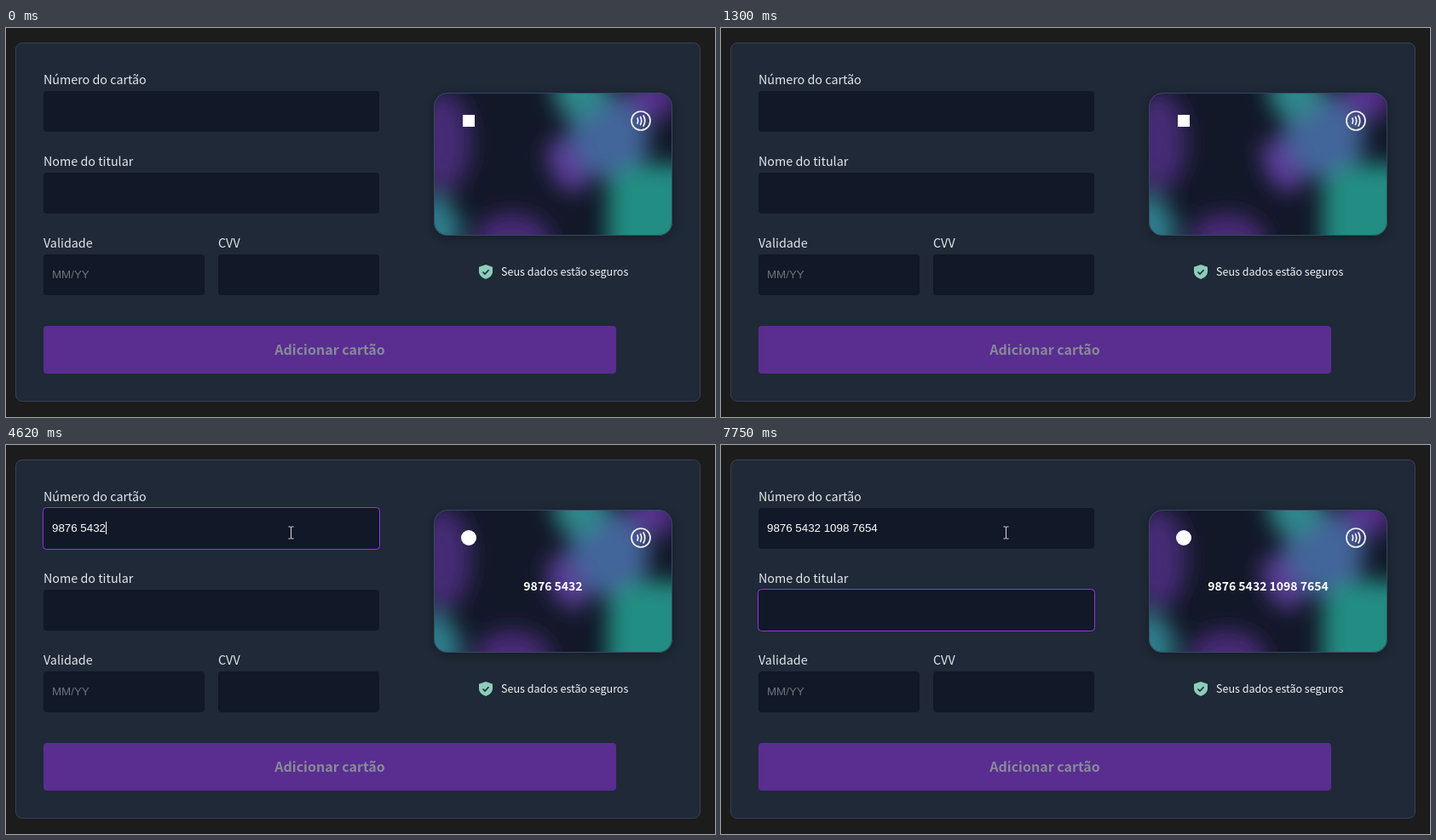
An HTML page for the animation above (8 s loop, 832 by 457 pixels).

```html
<!DOCTYPE html>
<html lang="pt-BR">
<head>
<meta charset="utf-8">
<title>Cartão</title>
<style>
  html, body { margin: 0; width: 100%; height: 100%; overflow: hidden; background: #1c1c1c; }
  svg { display: block; width: 100vw; height: 100vh; }
  text { font: 14.32px "Noto Sans CJK JP", "Noto Sans CJK SC", sans-serif; fill: #e5e7eb; white-space: pre; }
  .small { font-size: 12.53px; fill: #f3f4f6; }
  .button { font-size: 16px; font-weight: 700; fill: #868b98; text-anchor: middle; }
  .digits { font-size: 14px; font-weight: 700; fill: #fff; text-anchor: middle; }
  .input { font: 13.333px "Liberation Sans", Arial, sans-serif; fill: #fff; }
  .hint { fill: #6f737c; }
  .field { fill: #111827; }
  .line { fill: none; stroke: #f3f4f6; stroke-width: 1.7; stroke-linecap: round; }
</style>
</head>
<body>
<svg viewBox="0 0 832 457">
  <defs>
    <clipPath id="edge"><rect width="280" height="168" rx="16"/></clipPath>
    <filter id="soft" x="-30%" y="-30%" width="160%" height="160%"><feGaussianBlur stdDeviation="13"/></filter>
    <filter id="shade" x="-20%" y="-20%" width="140%" height="140%"><feGaussianBlur stdDeviation="6"/></filter>
  </defs>

  <rect x="11.5" y="17.5" width="803" height="421" rx="7.5" fill="#1f2937" stroke="#374151"/>
  <text x="44" y="66">Número do cartão</text>
  <text x="44" y="162">Nome do titular</text>
  <text x="44" y="258">Validade</text>
  <text x="249" y="258">CVV</text>
  <rect class="field" x="44" y="74" width="394" height="48" rx="4"/>
  <rect class="field" x="44" y="170" width="394" height="48" rx="4"/>
  <rect class="field" x="44" y="266" width="189" height="48" rx="4"/>
  <rect class="field" x="249" y="266" width="189" height="48" rx="4"/>
  <text class="input hint" x="54" y="294">MM/YY</text>
  <text class="input" id="typed" x="54" y="102"></text>
  <rect id="ring" x="43.5" width="395" height="49" rx="4" fill="none" stroke="#9333ea"/>
  <rect id="caret" width="1" height="15" fill="#fff"/>

  <rect x="44" y="350" width="672" height="56" rx="4" fill="#5a2d90"/>
  <text class="button" x="380" y="384">Adicionar cartão</text>

  <path d="M563 278l8 2.8v5.2c0 4.6-3.4 7.4-8 9-4.600-1.600-8-4.400-8-9v-5.200z" fill="#8ccdbb"/>
  <path d="M559.500 286.500l2.500 2.500 4.500-4.800" fill="none" stroke="#1f2937" stroke-width="1.600"/>
  <text class="small" x="581" y="291">Seus dados estão seguros</text>

  <g id="card">
    <rect y="3" width="280" height="168" rx="16" fill="#000" opacity=".28" filter="url(#shade)"/>
    <g clip-path="url(#edge)">
      <rect width="280" height="168" fill="#121828"/>
      <g filter="url(#soft)">
        <ellipse cx="10" cy="58" rx="34" ry="60" fill="#452a74"/>
        <ellipse cx="92" cy="176" rx="46" ry="34" fill="#4a2a78"/>
        <ellipse cx="-6" cy="162" rx="38" ry="42" fill="#2f7c8a"/>
        <ellipse cx="205" cy="52" rx="48" ry="50" fill="#43659a"/>
        <ellipse cx="172" cy="-2" rx="32" ry="34" fill="#2d878a"/>
        <ellipse cx="156" cy="86" rx="19" ry="34" fill="#5c3d9a" transform="rotate(-28 156 86)"/>
        <ellipse cx="258" cy="4" rx="30" ry="26" fill="#583090"/>
        <ellipse cx="294" cy="0" rx="18" ry="30" fill="#131828"/>
        <rect x="204" y="84" width="130" height="130" rx="36" fill="#228d82"/>
      </g>
    </g>
    <rect x=".5" y=".5" width="279" height="167" rx="15.500" fill="none" stroke="#374863"/>
    <g id="front">
      <rect id="square" x="34" y="26" width="14" height="14" fill="#fff"/>
      <circle id="dot" cx="41" cy="33" r="9" fill="#fff"/>
      <circle class="line" cx="243" cy="33" r="11"/>
      <path class="line" d="M239 30q1.500 3 0 6M242.500 28.500q2.500 4.500 0 9M246 27q3.500 6 0 12"/>
      <text class="digits" id="shown" x="140" y="95"></text>
    </g>
  </g>

  <path id="pointer" d="M-3 -7h2q1 0 1 1q0-1 1-1h2M0-6v12M-3 7h2q1 0 1-1q0 1 1 1h2" fill="none" stroke="#d8dade"/>
</svg>
<script>
const LOOP = 8000, NUMBER = "9876543210987654";
const KEYS = [3050, 3210, 3410, 3700, 3900, 4090, 4360, 4620,
              4690, 5090, 5290, 5500, 5690, 5960, 6220, 6490];
const FOCUS = 1940, NEXT = 7220, BLINK = 530;
const SPIN_START = 506, SPIN_TIME = 821;

const el = id => document.getElementById(id);
const show = (id, on) => el(id).setAttribute("visibility", on ? "inherit" : "hidden");
const set = (id, name, value) => el(id).setAttribute(name, value);
const easeInOut = p => p < .5 ? 4 * p ** 3 : 1 - 4 * (1 - p) ** 3;

function drawCard(t, text) {
  const p = Math.min(1, Math.max(0, (t - SPIN_START) / SPIN_TIME));
  const width = Math.cos(easeInOut(p) * 2 * Math.PI);
  set("card", "transform", `translate(642 76) scale(${width} 1) translate(-140 0)`);
  show("front", width > 0);
  show("square", width > 0 && !text);
  show("dot", width > 0 && text);
  el("shown").textContent = text;
}

function drawForm(t, text) {
  const onName = t >= NEXT, top = onName ? 169.5 : 73.5;
  el("typed").textContent = text;
  show("ring", t >= FOCUS);
  set("ring", "y", top);

  // The caret blinks while idle and stays lit during typing.
  const idle = onName ? t - NEXT : t < KEYS[0] ? t - (2450 - BLINK) : 0;
  show("caret", t >= FOCUS && idle < BLINK);
  const spaces = text.split(" ").length - 1;
  const advance = 7.415 * (text.length - spaces) + 3.704 * spaces;
  set("caret", "x", onName ? 54 : Math.floor(54 + advance));
  set("caret", "y", top + 16.5);

  show("pointer", t >= 1380);
  set("pointer", "transform", t < FOCUS ? "translate(333.5 104)" : "translate(334.5 103)");
}

function frame(now) {
  const t = now % LOOP;
  const count = KEYS.filter(k => k <= t).length;
  const text = NUMBER.slice(0, count).replace(/(\d{4})(?=\d)/g, "$1 ");
  drawCard(t, text);
  drawForm(t, text);
  requestAnimationFrame(frame);
}
const start = performance.now();
const tick = () => frame(Math.max(0, performance.now() - start));
frame = (draw => () => draw(Math.max(0, performance.now() - start)))(frame);
tick();
</script>
</body>
</html>
```
